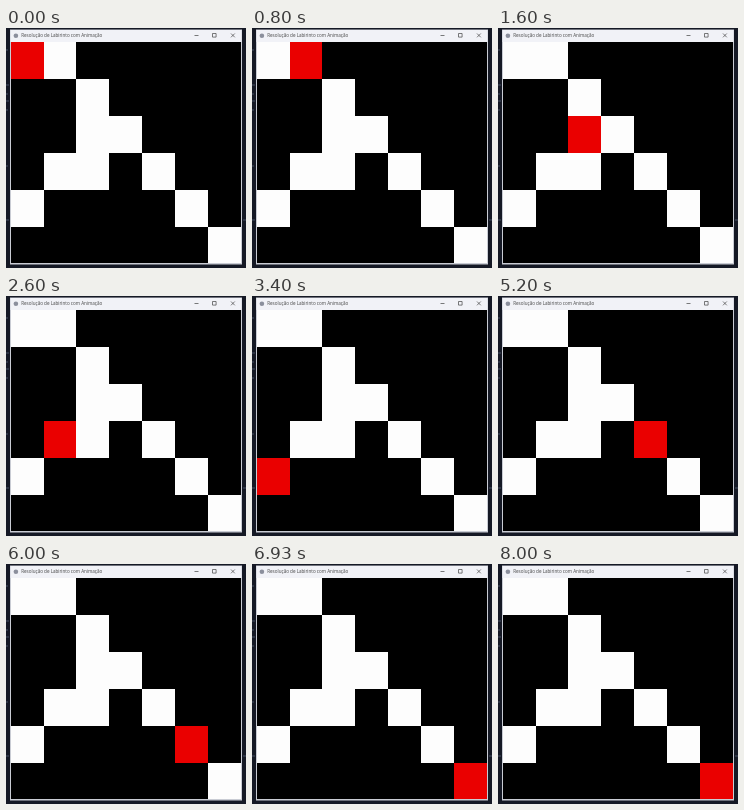
Write an HTML page that moves like this. It is 240x240 px and loops after 8.07 s.

```html
<!DOCTYPE html>
<html lang="pt">
<head>
<meta charset="utf-8">
<title>Labirinto</title>
<style>
html, body { margin: 0; height: 100%; overflow: hidden; background: #151925; }
svg { display: block; width: 100vw; height: 100vh; }
text { font: 4.57px "Open Sans", "Noto Sans", sans-serif; fill: #444; }
</style>
</head>
<body>
<svg viewBox="0 0 240 240">
  <rect width="240" height="240" fill="#151925"/>
  <path d="M0 22h2M0 57h3M0 66h2M0 73h3M0 82h2M0 138h2M0 192h3M237 192h3" stroke="#465064"/>
  <rect x="4" y="1.5" width="232" height="235" fill="#c9ccd4"/>
  <rect x="4.5" y="2" width="231" height="12" fill="#f1f2f7"/>
  <circle cx="9.9" cy="7.8" r="2.3" fill="#8b8f9c"/>
  <text x="15.2" y="9.3">Resolução de Labirinto com Animação</text>
  <path d="M188.5 7.5h4M206.5 5.5h3.6v3.6h-3.6zM225 5.5l3.8 3.8m0-3.8l-3.8 3.8" fill="none" stroke="#444" stroke-width=".7"/>
  <g id="maze" shape-rendering="crispEdges"></g>
</svg>
<script>
const LOOP = 8070, STEP = 505;
const X = 4.6, Y = 14, W = 32.93, H = 36.9;
const maze = document.getElementById("maze");
const rows = ["1100000", "0010000", "0011000", "0110100", "1000010", "0000001"];

// Row and column at each step; a dead end shows its cell again while backtracking
const path = ["00", "01", "12", "22", "32", "31", "40", "40", "31", "23", "34", "45", "56"];

function addRect(col, row, cols, count, fill) {
  const r = document.createElementNS("http://www.w3.org/2000/svg", "rect");
  const box = { x: X + col * W, y: Y + row * H, width: cols * W, height: count * H, fill };
  for (const k in box) r.setAttribute(k, box[k]);
  return maze.appendChild(r);
}

addRect(0, 0, 7, 6, "#000");
rows.forEach((line, row) => [...line].forEach((cell, col) => {
  if (cell === "1") addRect(col, row, 1, 1, "#fdfdfd");
}));
const walker = addRect(0, 0, 1, 1, "#ea0000");

function draw() {
  const step = Math.floor(performance.now() % LOOP / STEP);
  const [row, col] = path[Math.min(step, path.length - 1)];
  walker.setAttribute("x", X + col * W);
  walker.setAttribute("y", Y + row * H);
  requestAnimationFrame(draw);
}
draw();
</script>
</body>
</html>
```
